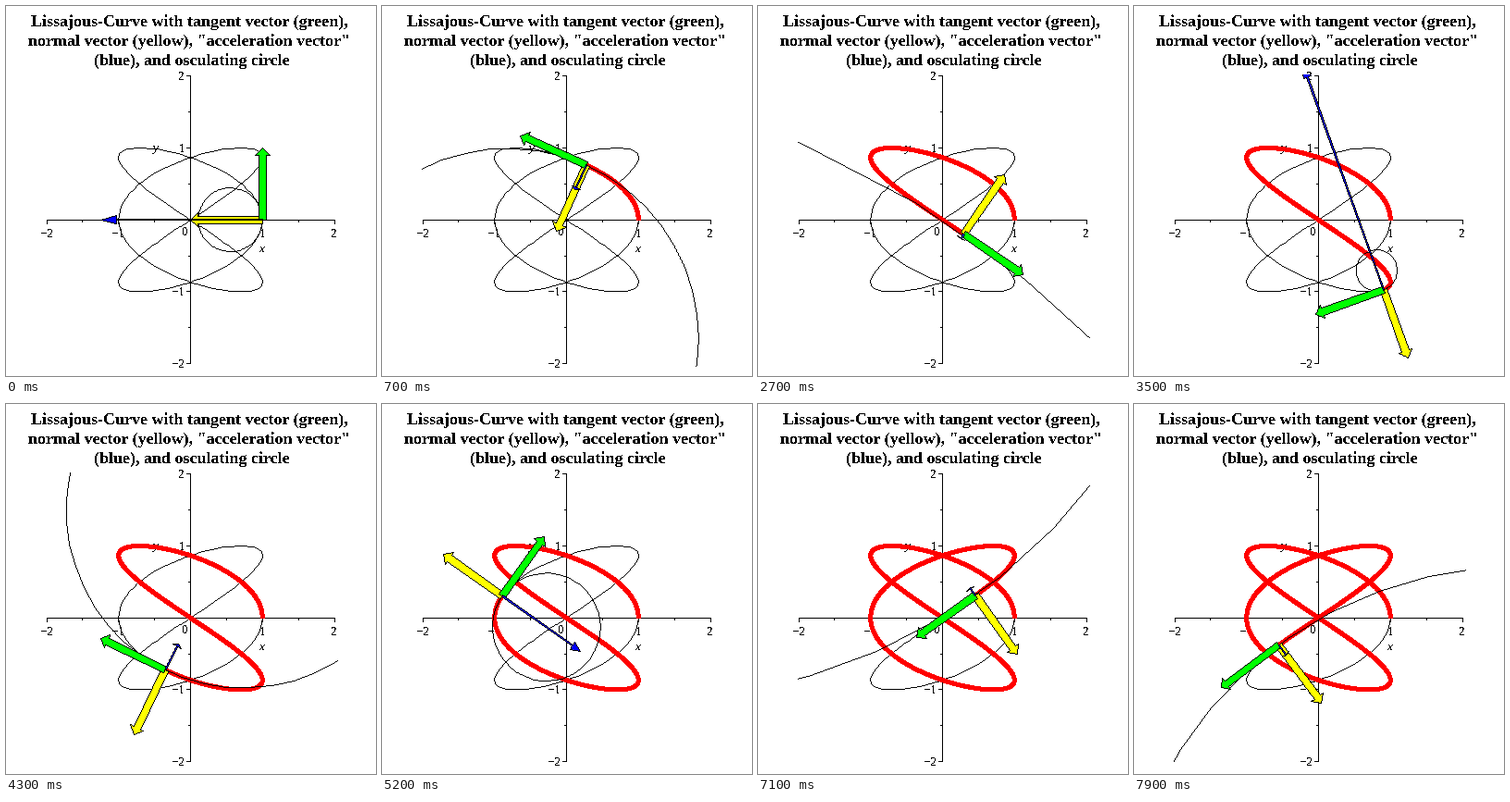
Animation of 400 by 400 pixels, one loop 8000 ms. Source, as a matplotlib script:

```python
import numpy as np
import matplotlib.pyplot as plt
from matplotlib.animation import FuncAnimation
from matplotlib.patches import Polygon, Rectangle

SIZE = 400
FRAMES, INTERVAL = 80, 100
STEPS = 100                      # steps for one full trip along the curve
UNIT = 77.75                     # pixels per plot unit
CX, CY = 199.5, 231.2            # pixel position of the plot's zero point
PX = 0.72                        # points per pixel at 100 dpi

plt.rcParams.update({
    "lines.antialiased": False,
    "text.antialiased": False,
    "text.hinting": "native",
    "font.family": "Liberation Serif",
})


def curve(t):
    return np.array([np.cos(3 * t), np.sin(2 * t)])


def velocity(t):
    return np.array([-3 * np.sin(3 * t), 2 * np.cos(2 * t)])


def acceleration(t):
    return np.array([-9 * np.cos(3 * t), -4 * np.sin(2 * t)])


def to_px(p):
    return np.array([CX + UNIT * p[0], CY - UNIT * p[1]])


def time_steps():
    """Curve parameter per frame: nearly constant speed by Euler steps."""
    grid = np.linspace(0, 2 * np.pi, 4000, endpoint=False)
    length = 2 * np.pi * np.hypot(*velocity(grid)).mean()
    times = [0.0]
    while len(times) < FRAMES:
        t = times[-1]
        times.append(t + length / STEPS / np.hypot(*velocity(t)))
    return times


def trace(xy):
    """Pixels of a one-pixel polyline, as marker positions."""
    xy = np.floor(xy)
    parts = []
    for a, b in zip(xy.T[:-1], xy.T[1:]):
        n = int(max(abs(b - a)))
        parts.append(np.linspace(a, b, n + 1))
    x, y = np.rint(np.concatenate(parts)).T
    return x, y + 1


def arrow(start, vec, width, head_width):
    """Outline of a block arrow whose head takes a tenth of its length."""
    length = np.hypot(*vec)
    d = vec / length
    n = np.array([-d[1], d[0]])
    neck = 0.9 * length
    outline = [(0, width), (neck, width), (neck, head_width), (length, 0),
               (neck, -head_width), (neck, -width), (0, -width), (0, width)]
    return to_px(np.array([start + a * d + b / 2 * n for a, b in outline]).T)


fig = plt.figure(figsize=(4, 4), dpi=100, facecolor="white")
ax = fig.add_axes([0, 0, 1, 1])
ax.set_xlim(0, SIZE)
ax.set_ylim(SIZE, 0)
ax.axis("off")
view = Rectangle((43, 74), 315, 315, transform=ax.transData)


def label(x, y, s, size=13, ha="center", **kw):
    ax.text(x, y, s, fontsize=size * PX, ha=ha, va="baseline", **kw)


def thin_line(xy=None, z=1):
    x, y = ([], []) if xy is None else trace(np.array(xy))
    item, = ax.plot(x, y, ",", color="k", zorder=z)
    item.set_clip_path(view)
    return item


class Arrow:
    def __init__(self, color, z, width, head_width):
        self.widths = width, head_width
        self.fill = ax.add_patch(Polygon(np.zeros((1, 2)), fc=color,
                                         ec="none", lw=0, zorder=z))
        self.fill.set_clip_path(view)
        self.edge = thin_line(z=z + 0.5)

    def place(self, start, vec):
        xy = arrow(start, vec, *self.widths)
        self.fill.set_xy(xy.T)
        self.edge.set_data(*trace(xy))


title = [
    (198, 22, "Lissajous-Curve with tangent vector (green),"),
    (198.5, 43, "normal vector (yellow), \"acceleration vector\""),
    (201, 64, "(blue), and osculating circle"),
]
for x, y, s in title:
    label(x, y, s, size=18, weight="bold")

# Axes with major and minor ticks
thin_line([[CX - 2 * UNIT, CX + 2 * UNIT], [CY, CY]])
thin_line([[CX, CX], [CY - 2 * UNIT, CY + 2 * UNIT]])
for k in range(-4, 5):
    if k == 0:
        continue
    tick = 2 if k % 2 else 4
    x, y = to_px((k / 2, k / 2))
    thin_line([[x, x], [CY, CY + tick]])
    thin_line([[CX - tick, CX], [y, y]])
    if k % 2 == 0:
        s = str(k // 2).replace("-", "\u2212")
        label(x, 250, s)
        label(193, y + 4.5, s, ha="right")
label(193.5, 248, "0")
label(277, 266, "x", style="italic")
label(162, 157, "y", style="italic")

thin_line(to_px(curve(np.linspace(0, 2 * np.pi, 201))), z=2)
trail, = ax.plot([], [], color="#ff0000", lw=4 * PX, zorder=3,
                 solid_capstyle="butt")
trail.set_clip_path(view)
circle = thin_line(z=4)
normal = Arrow("#ffff00", 5, 0.1, 0.2)
tangent = Arrow("#00ff00", 6, 0.1, 0.2)
bend = Arrow("#0000ff", 7, 0.02, 0.12)

THETA = np.linspace(0, 2 * np.pi, 50)
RING = np.array([np.cos(THETA), np.sin(THETA)])
TIMES = time_steps()


def update(i):
    t = TIMES[i]
    p, v, a = curve(t), velocity(t), acceleration(t)
    speed = np.hypot(*v)
    tan = v / speed
    nor = np.array([-tan[1], tan[0]])
    kappa = (v[0] * a[1] - v[1] * a[0]) / speed ** 3

    trail.set_data(*to_px(curve(np.linspace(0, t, 8 * i + 1))))
    center = p + nor / kappa
    circle.set_data(*trace(to_px(center[:, None] + RING / abs(kappa))))
    normal.place(p, nor)
    tangent.place(p, tan)
    bend.place(p, kappa * nor)


anim = FuncAnimation(fig, update, frames=FRAMES, interval=INTERVAL,
                     repeat=True, repeat_delay=0, blit=False)
plt.show()
```
